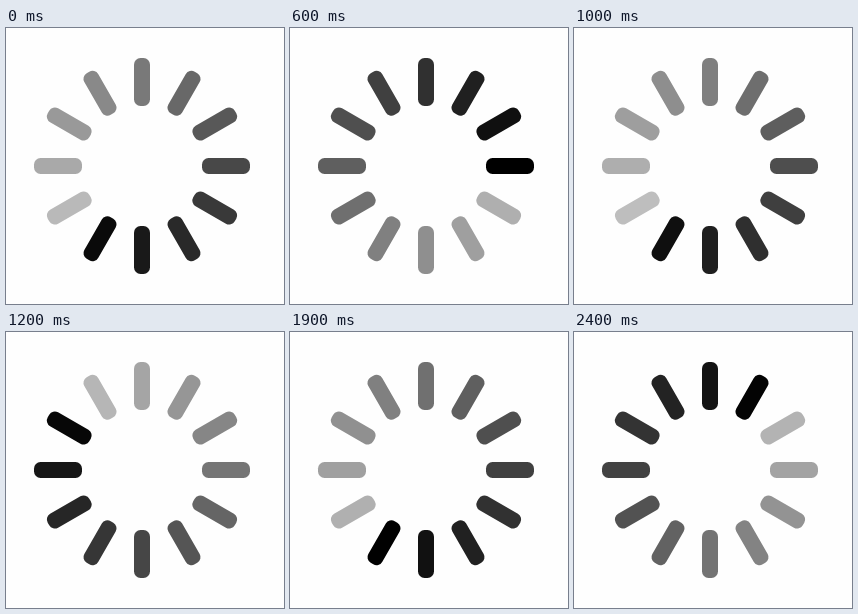
Recreate the animation shown at these times as an HTML page. Size 278 px wide and 276 px high, loop 2500 ms.

```html
<!DOCTYPE html>
<html lang="en">
<head>
<meta charset="utf-8">
<title>Spinner</title>
<style>
  html, body { margin: 0; width: 100%; height: 100%; overflow: hidden; background: #fefefe; }
  svg { display: block; }
</style>
</head>
<body>
<svg id="spinner" width="278" height="276" viewBox="0 0 278 276"></svg>
<script>
  const SPOKES = 12;
  const LOOP = 2500;      // ms
  const TICK = 100;       // ms each pose is held
  const START = 7.6;      // head position at time zero, in spokes clockwise from the top
  const PER_TICK = 1.234; // spokes the head advances per tick
  const FADE = 0.75;      // opacity lost over one full turn

  const svg = document.getElementById('spinner');
  const spokes = Array.from({ length: SPOKES }, (_, i) => {
    const rect = document.createElementNS('http://www.w3.org/2000/svg', 'rect');
    const attrs = {
      x: 128, y: 30, width: 16, height: 48, rx: 6.5,
      transform: `rotate(${i * 360 / SPOKES} 136 138)`
    };
    for (const name in attrs) rect.setAttribute(name, attrs[name]);
    return svg.appendChild(rect);
  });

  function draw() {
    const tick = Math.floor((performance.now() % LOOP) / TICK);
    const head = START + tick * PER_TICK;
    spokes.forEach((spoke, i) => {
      const age = (head - i + SPOKES) % SPOKES;
      spoke.setAttribute('opacity', 1 - FADE * age / SPOKES);
    });
    requestAnimationFrame(draw);
  }
  draw();
</script>
</body>
</html>
```
